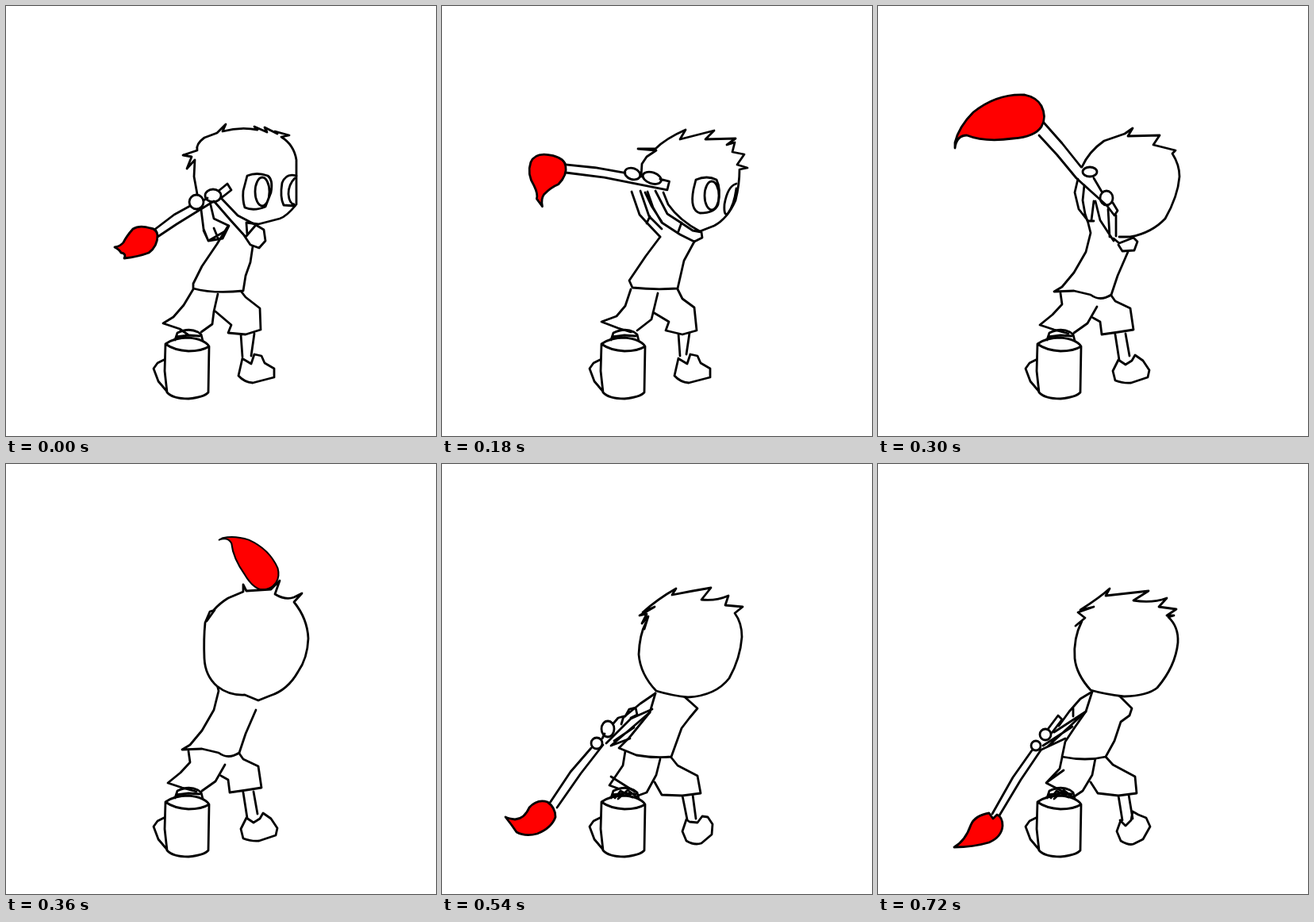
Write an HTML page with a canvas that moves like this. It is 542 px wide and 542 px high and loops after 780 ms.

```html
<!DOCTYPE html>
<html lang="en">
<head>
<meta charset="utf-8">
<title>Painter swinging a brush</title>
<style>
html, body { margin: 0; height: 100%; overflow: hidden; background: #fff; }
canvas { display: block; width: 100vw; height: 100vh; }
</style>
</head>
<body>
<canvas id="stage" width="542" height="542"></canvas>
<script>
const STEP = 60;
const ctx = document.getElementById('stage').getContext('2d');
const oval = (x, y, rx, ry = rx) =>
  `M${x - rx} ${y}a${rx} ${ry} 0 1 0 ${2 * rx} 0a${rx} ${ry} 0 1 0 ${-2 * rx} 0Z`;

const foot = 'M199 446L191 450 186 457 192 473 203 486';
const bucket = 'M201 426Q212 418 230 418Q250 420 256 429L255 487Q250 493 230 495Q210 495 203 487L200 460Z' +
  'M201 426Q212 434 230 435Q247 435 256 429';
const bail = 'M213 421L216 412Q230 405 242 411L246 414 248 422M215 417L230 415 244 416';
const crossedBail = bail + 'M218 421L225 412 240 420M222 422L234 411 246 420';

const shoe = {
  flat: 'M298 444L293 466Q300 474 311 475L338 468 338 457 326 450 322 441 313 439 309 451 299 445',
  round: 'M303 446L296 460 299 472Q310 476 319 475L340 468 342 459 334 447 324 440 320 447 312 452 303 446',
  heel: 'M306 449L301 463 306 475Q316 481 322 479L334 473 343 457 338 446 328 442 321 438 319 449 312 456 305 449',
  ball: 'M308 448L303 463 308 475Q318 481 327 478L340 467 341 454 335 445 328 444 322 452 312 451Z',
};

const windUp = {
  legs: 'M236 357L224 377 211 392 198 400 219 407 229 414M267 363L262 385 260 401 246 411' +
    'M295 358L302 367 320 381 321 408 302 414 280 412 284 402 264 385' +
    'M296 414L298 442M313 413L309 441' + shoe.flat,
  shirt: 'M280 277L266 300 247 328 236 350 236 356Q262 363 299 359L302 340 308 323 311 303',
  head: 'M241 237L237 215 238 194 228 205 234 190 223 188 241 182Q239 174 250 166L266 160 277 149 273 158' +
    'Q295 152 317 156L313 152 329 159 326 153 342 161 339 158 357 163 347 165Q363 175 366 194L366 250' +
    'Q354 265 345 268L318 275 303 273',
  eyes: 'M304 214Q316 209 330 214Q337 219 334 235L327 253Q312 259 301 254Q298 245 299 233Z' + oval(323, 234, 9, 18) +
    'M366 214Q353 210 348 223Q345 241 350 251L364 252M364 217Q356 225 356 237Q357 249 363 250',
  arms: 'M246 257L249 281 255 296 273 293 281 277M258 251L262 268 281 277M249 283L255 296 276 284M262 280L267 292' +
    'M263 247L283 270 302 291M272 243L292 264 315 276M303 290L315 276 325 282 327 296 319 305 308 301 300 289M303 274L304 288',
  brush: 'M187 282L212 263 232 252M191 291L215 275 262 246M249 245L254 242M268 233L279 224 284 232 270 243' +
    oval(240, 247, 9) + oval(261, 239, 10, 8),
  tip: 'M191 289Q190 281 182 280Q168 276 160 281Q152 290 148 298Q144 303 137 304Q143 307 145 311Q152 312 149 318Q167 316 180 311Q191 303 191 289Z',
  bail,
};

const level = {
  legs: 'M238 357L231 378 220 391 201 398 222 406 238 411M272 362L264 395 246 409' +
    'M297 357L303 369 318 380 321 409 303 414 282 409 286 398 266 386' +
    'M298 413L300 441M312 412L308 439' + shoe.flat,
  shirt: 'M275 291L257 315 236 346 240 355Q268 358 297 356L305 321 318 297',
  head: 'M251 215L252 199 258 190 270 182 247 180 269 180Q282 167 307 156L300 168 343 157 332 168 370 167 359 175' +
    'L369 172 366 184 381 187 372 200 385 204 375 206Q375 225 370 245Q360 268 343 277L325 284Q299 270 285 250L279 235',
  eyes: 'M320 219Q334 213 346 219Q352 231 348 250Q344 261 325 261Q312 257 317 231Z' + oval(340, 239, 9, 18) +
    'M371 224Q360 227 356 250Q355 265 360 262Q368 252 371 230',
  arms: 'M239 234L249 263 259 274 275 291M250 233L261 265 277 281M258 274L262 265M259 234L266 254 277 273 300 288 318 297' +
    'M269 233L284 262 301 273 316 283 327 285 328 292 318 297M298 284L302 273M256 235L264 252 277 272',
  brush: 'M151 239L190 230 228 224M157 248L205 238 285 227 284 216 272 217M247 220L250 219' +
    oval(237, 222, 10, 7) + oval(262, 219, 12, 7),
  tip: 'M154 240Q150 232 135 233Q112 235 111 250Q111 266 125 277Q133 285 133 291L143 298Q138 290 140 283Q145 272 153 265Q160 250 154 240Z',
  bail,
};

const lift = {
  legs: 'M232 363L230 377 201 399 223 409 239 413M276 375L263 400 243 413' +
    'M293 363L297 370 319 381 322 410 301 411 281 414 278 398 270 392' +
    'M299 413L304 446M312 413L318 444' + shoe.round,
  shirt: 'M272 293L251 324 236 345 221 356Q242 365 262 363L292 366 302 340 303 325 315 303',
  head: 'M251 208Q262 178 280 167L312 154 304 165 349 158 337 168 374 171 364 178 376 192 388 195 380 199' +
    'Q380 222 372 240Q355 275 335 284L307 288',
  eyes: 'M374 235L365 237Q358 252 356 265Q361 268 368 254Z',
  arms: 'M251 230L253 250 262 270 272 293M264 237L266 253 272 268M262 274L273 271M268 253L275 279 292 293' +
    'M276 243L283 268 300 292M290 249L303 272 306 289M296 291L305 287' +
    'M304 290L320 291 327 288 331 294 325 302 314 302 305 293',
  brush: 'M164 165L206 191 244 211M165 182L206 206 248 227M261 219L267 225M254 230L288 248 293 241 284 236' +
    oval(252, 215, 9, 8) + oval(276, 231, 9, 7),
  tip: 'M154 144Q140 139 122 143Q101 160 99 183Q106 200 120 213L132 229 137 237Q139 222 145 212Q147 195 157 190Q165 182 164 166Z',
  bail,
};

const raise = {
  legs: 'M230 362L232 376 220 389 204 402 222 408 240 413M276 379L264 400 247 412' +
    'M292 362L299 372 318 381 322 408 303 411 282 414 280 398 271 393' +
    'M299 414L304 446M312 413L317 441' + shoe.round,
  shirt: 'M264 270L268 286 262 310 247 336 232 354 222 360 247 359 268 364Q280 373 294 364L302 340 315 310',
  head: 'M257 203Q266 183 285 170L311 161 321 154 315 164 355 163 347 175 375 182 371 186Q380 200 380 215' +
    'Q378 240 362 268Q345 286 318 291L304 291',
  eyes: '',
  arms: 'M252 218L248 235 253 256 264 270M260 226L258 245 261 262 264 271 272 271M272 246L269 270M274 246L280 270 297 296' +
    'M300 264L300 290M290 256L292 291M297 293L304 299 322 292 327 297 323 308 308 309 303 301',
  brush: 'M209 147L232 173 256 203M203 163L226 188 250 217 290 253M272 217L282 234M288 251L298 264 302 258 296 248' +
    oval(267, 209, 9, 6) + oval(288, 242, 8, 9),
  tip: 'M185 112Q150 110 120 134Q102 152 97 172L97 179Q99 163 112 163Q135 172 170 167Q198 165 206 152Q213 140 206 126Q200 115 185 112Z',
  bail,
};

const behind = {
  legs: 'M231 362L229 382 208 398 243 412M210 399L222 409M276 370L274 385 262 412 247 418' +
    'M290 367L296 377 320 389 325 412 303 416 280 416 270 399' +
    'M300 416L306 447M313 416L320 440' + shoe.heel,
  shirt: 'M264 284L260 305 247 335 234 355 213 359 230 358 246 367Q268 372 295 364L302 345 320 320 340 287M332 293L316 320',
  head: 'M262 184Q270 175 280 169L299 161 299 152 303 160 334 158 345 147 339 164Q352 172 363 168L373 163 363 174' +
    'Q380 195 381 220Q380 245 368 262Q355 285 333 292L318 298 301 291Q281 292 266 280Q251 267 250 245Q249 220 251 200L257 186 263 184 253 198',
  eyes: '', arms: '', brush: '',
  tip: 'M370 212L379 217Q388 222 398 213Q408 205 412 197Q411 220 403 237Q390 250 370 256Z',
  bail: crossedBail, under: true,
};

const settle = {
  legs: 'M231 362L228 380 211 405 222 409M213 394L243 413M275 372L270 392 258 414 247 418' +
    'M289 370L297 380 322 393 326 415 303 418 277 417 268 401' +
    'M303 418L309 448M316 417L320 447' + shoe.ball,
  shirt: 'M269 289L262 313 236 345 223 358 245 367Q268 371 289 369L302 333 312 320 322 308 304 292',
  head: 'M255 208L260 192 252 201 258 189 249 191 268 180 253 187Q272 170 295 157L290 165Q315 160 339 156L327 171' +
    'Q345 173 361 166L357 178 379 180 369 188Q378 200 378 218Q376 245 362 270Q345 292 310 294' +
    'Q290 292 270 286Q250 265 248 240Q249 215 257 200',
  eyes: '',
  arms: 'M269 289L250 302 228 320M265 309L238 321 207 352M262 313L213 355 237 346M217 349L242 332M231 318L236 309 244 307 246 316 238 320',
  brush: 'M188 358L162 388 136 427M203 354L175 390 145 433M202 346L205 340M216 327L222 320 229 318 226 328' +
    oval(209, 334, 8, 10) + oval(195, 352, 7),
  tip: 'M133 426Q120 422 110 433Q104 447 92 448Q84 447 80 445Q88 455 94 464Q105 470 120 466Q138 459 143 445Q143 433 133 426Z',
  bail: crossedBail,
};

const rest = {
  legs: 'M232 370L229 384 212 402 243 418M213 401L234 386M274 371L270 392 258 412 246 420' +
    'M287 369L296 379 324 394 326 415 303 418 277 415 268 401' +
    'M303 418L308 449M316 417L321 447' + shoe.heel,
  shirt: 'M270 287L262 312 248 332 236 350 232 369Q262 375 287 369L298 349 306 325 317 317 320 308 304 292',
  head: 'M249 204L261 194 252 187 272 180 255 184Q280 168 292 157L287 166 341 160 322 172Q345 176 364 169L354 180' +
    'L376 183 364 191 373 191 366 193Q379 205 378 225Q375 255 352 282Q340 292 310 293Q285 290 268 285Q250 265 248 245Q246 220 257 198',
  eyes: '',
  arms: 'M270 287L255 296 241 312 228 330M262 312L222 338M262 312L214 356M206 360L236 346M208 355L245 331M246 308L246 318',
  brush: 'M194 361L170 395 144 441M205 361L180 398 153 443M215 333L227 317 232 322 219 339' +
    oval(211, 341, 7) + oval(199, 355, 6),
  tip: 'M140 440Q122 443 117 455Q110 475 96 483Q120 483 140 477Q156 470 157 456Q157 445 150 442L145 447Z',
  bail: crossedBail,
};

// turn: degrees, pivot x, pivot y, scale
const poses = [
  windUp,
  { ...windUp, headAt: [6, 3], turn: [11, 270, 238, 1] },
  level,
  { ...level, turn: [19, 270, 226, 1] },
  lift,
  raise,
  { ...raise, head: behind.head, arms: '', turn: [63, 290, 245, .74], under: true },
  behind,
  { ...behind, head: settle.head,
    brush: 'M300 312L384 328M300 324L380 340',
    tip: 'M382 322Q395 312 414 317Q431 315 439 300Q440 332 424 347Q404 360 386 351Q374 340 382 322Z' },
  settle,
  { ...settle, turn: [-2, 200, 345, 1] },
  { ...rest, turn: [2, 200, 352, 1] },
  rest,
];

function draw(d, fill) {
  const path = new Path2D(d);
  if (fill) { ctx.fillStyle = fill; ctx.fill(path); }
  ctx.stroke(path);
}

function drawBrush({ brush, tip, turn: [deg, x, y, scale] = [0, 0, 0, 1] }) {
  ctx.save();
  ctx.translate(x, y);
  ctx.rotate(deg * Math.PI / 180);
  ctx.scale(scale, scale);
  ctx.translate(-x, -y);
  draw(brush);
  draw(tip, '#f00');
  ctx.restore();
}

function drawPose(pose) {
  ctx.fillStyle = '#fff';
  ctx.fillRect(0, 0, 542, 542);
  ctx.lineWidth = 2.8;
  ctx.lineCap = ctx.lineJoin = 'round';
  if (pose.under) drawBrush(pose);
  draw(pose.legs);
  draw(pose.shirt, '#fff');
  ctx.save();
  ctx.translate(...(pose.headAt || [0, 0]));
  draw(pose.head, '#fff');
  draw(pose.eyes);
  ctx.restore();
  draw(pose.arms);
  if (!pose.under) drawBrush(pose);
  draw(foot);
  draw(bucket, '#fff');
  draw(pose.bail);
}

function tick() {
  drawPose(poses[Math.floor(performance.now() / STEP) % poses.length]);
  requestAnimationFrame(tick);
}
tick();
</script>
</body>
</html>
```
